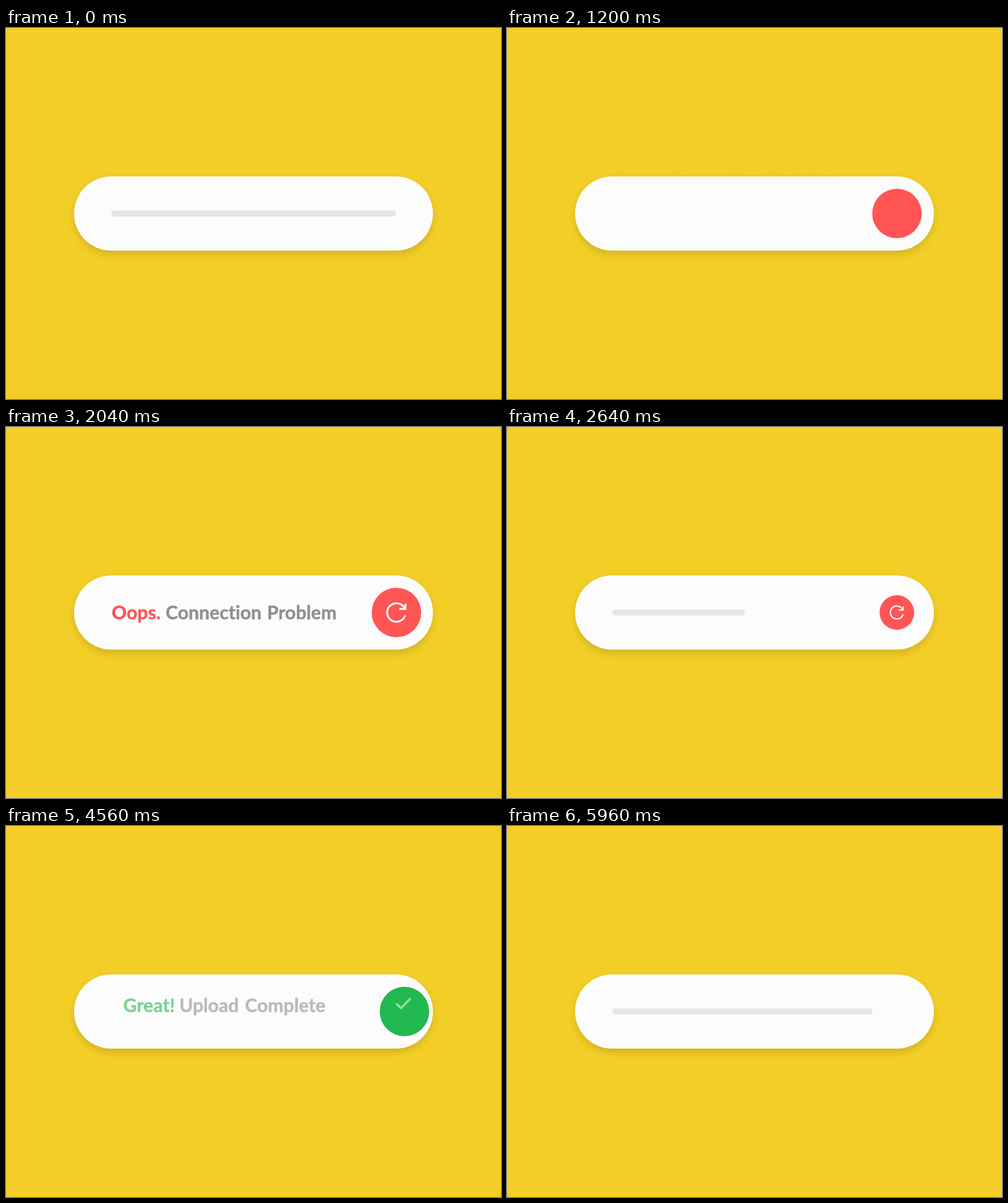
Write an HTML page that moves like this. It is 800 px wide and 600 px high and loops after 6000 ms.

```html
<!DOCTYPE html>
<html lang="en">
<head>
<meta charset="utf-8">
<title>Upload status</title>
<style>
  html, body { margin: 0; width: 100%; height: 100%; overflow: hidden; background: #f2ce27; }
  .pill {
    position: absolute; left: 110px; top: 240px; width: 580px; height: 120px;
    border-radius: 60px; background: #fcfcfc;
    box-shadow: 0 6px 12px rgba(0, 0, 0, .13);
  }
  svg { position: absolute; left: 0; top: 0; width: 800px; height: 600px; }
  text {
    font: 700 30px Lato, "Open Sans", sans-serif;
    font-variant-ligatures: none; letter-spacing: .1px;
    stroke-width: .5; fill: #909090; stroke: #909090;
  }
  .bad { fill: #ff5555; stroke: #ff5555; }
  .good { fill: #22b950; stroke: #22b950; }
  .icon { fill: none; stroke: #fcfcfc; stroke-width: 3; stroke-linecap: round; }
</style>
</head>
<body>
<div class="pill"></div>
<svg viewBox="0 0 800 600">
  <rect id="track" y="295" height="10" rx="5" fill="#e6e6e6"/>
  <rect id="fill" y="297" height="6" rx="3" fill="#3d8dfa"/>
  <g id="failText">
    <text y="310.5"><tspan class="bad" x="170.8">Oops.</tspan> <tspan x="258">Connection</tspan> <tspan x="421.8">Problem</tspan></text>
  </g>
  <g id="doneText">
    <text y="310.5"><tspan class="good" x="189.5">Great!</tspan> <tspan x="280">Upload</tspan> <tspan x="386.3">Complete</tspan></text>
  </g>
  <g id="ball">
    <circle id="disc" r="40"/>
    <g id="failIcon" class="icon">
      <path d="M13.9 -5.5A15 15 0 1 0 13.9 5.5"/>
      <path d="M14.6 -13.2V-5.8H6"/>
    </g>
    <g id="doneIcon" class="icon">
      <path d="M-12.2 -1L-5.7 5L8.7 -9.3" stroke-width="3.6"/>
    </g>
  </g>
</svg>
<script>
  const LOOP = 6000, RETRY = 3200;
  const LEFT = 170, RIGHT = 630;
  const $ = id => document.getElementById(id);
  const part = (t, from, to) => Math.min(1, Math.max(0, (t - from) / (to - from)));
  const inOut = p => p < .5 ? 2 * p * p : 1 - 2 * (1 - p) ** 2;
  const outQuad = p => 1 - (1 - p) ** 2;
  const soft = p => .5 * p + .25 * (1 - Math.cos(Math.PI * p));

  function setBar(el, x, width) {
    el.setAttribute('x', x);
    el.setAttribute('width', Math.max(0, width));
  }

  // The collapsing bar nudges the ball right, then it settles slowly.
  function ballX(t) {
    if (t < 1310) return RIGHT + 17 * Math.sin(Math.PI / 2 * part(t, 1200, 1310));
    return RIGHT + 17 * Math.exp((1310 - t) / 260);
  }

  // Pops in, swells briefly, then shrinks away.
  function ballScale(t) {
    if (t < 1300) return outQuad(part(t, 1050, 1190));
    if (t < 2560) return 1 + .14 * Math.sin(Math.PI * part(t, 2450, 2560));
    return 1 - part(t, 2560, 2740) ** 1.5;
  }

  function drop(el, height, p, opacity) {
    el.setAttribute('transform', `translate(0 ${-height * (1 - p) ** 2})`);
    el.setAttribute('opacity', opacity);
  }

  function showMessage(name, t, shown) {
    const text = part(t, 1200, 1467), icon = part(t, 1215, 1490);
    const fade = 1 - part(t, 2460, 2640);
    drop($(name + 'Text'), 58, text, shown ? text * fade : 0);
    drop($(name + 'Icon'), 48, icon, shown ? icon : 0);
  }

  function draw(now) {
    const time = now % LOOP;
    const done = time >= RETRY;
    const t = done ? time - RETRY : time;
    const leaving = t < 1300;

    const x = leaving ? LEFT + (RIGHT - LEFT) * part(t, 1000, 1160) ** 2 : LEFT;
    const width = leaving ? RIGHT - x : (RIGHT - LEFT) * soft(part(t, 2498, 2800));
    const progress = leaving ? (done ? 1 : .7) * inOut(part(t, 0, 1000)) : 0;
    setBar($('track'), x, width);
    setBar($('fill'), x + 2, (width - 4) * progress);

    $('ball').setAttribute('transform', `translate(${ballX(t)} 300) scale(${ballScale(t)})`);
    $('disc').setAttribute('fill', done ? '#22b950' : '#ff5555');
    showMessage('fail', t, !done);
    showMessage('done', t, done);
  }

  function tick() {
    draw(performance.now());
    requestAnimationFrame(tick);
  }
  tick();
</script>
</body>
</html>
```
